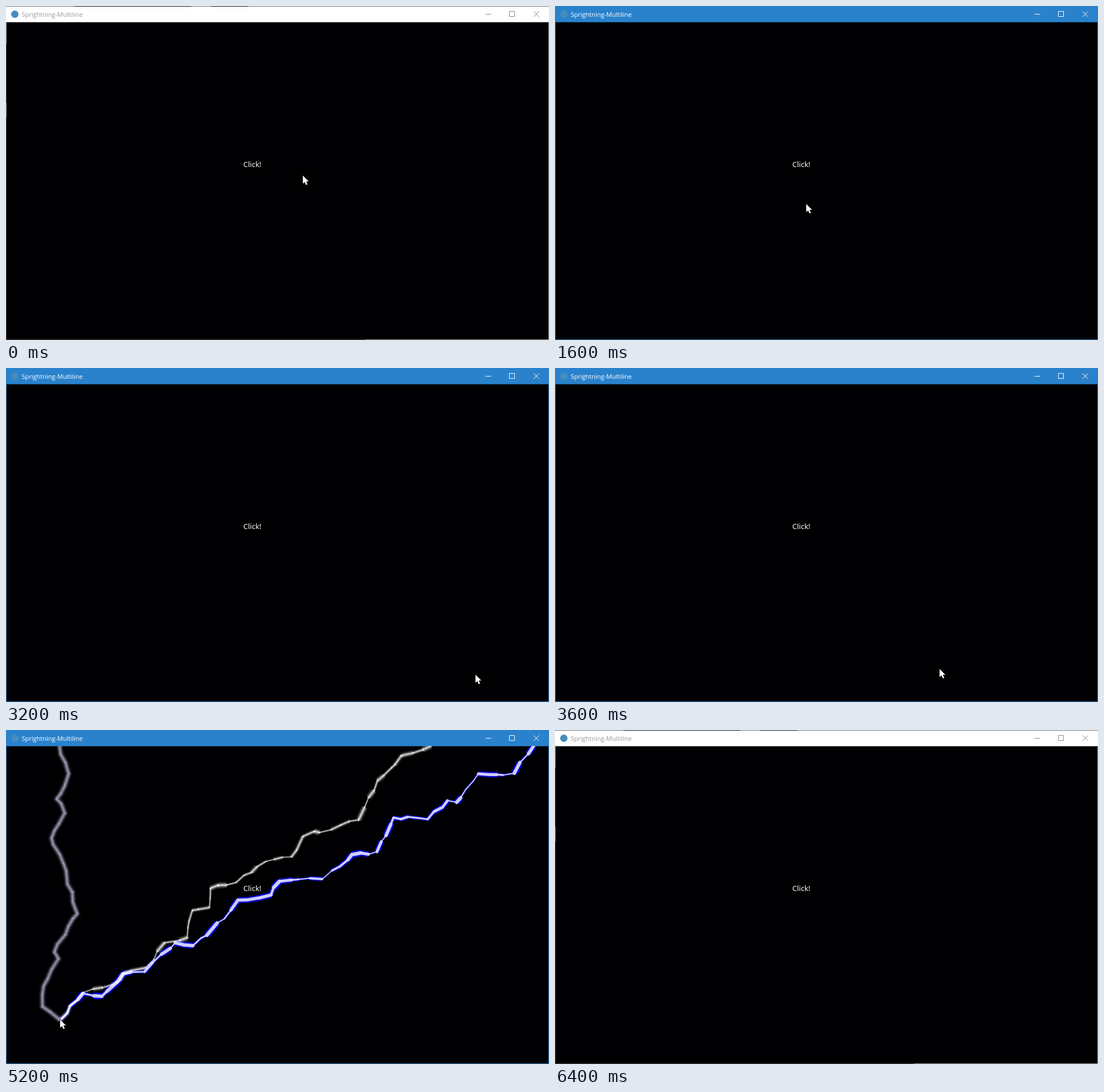
An HTML page that plays this animation: 953x587 px, repeating every 6600 ms.

```html
<!DOCTYPE html>
<html lang="en">
<head>
<meta charset="utf-8">
<title>Sprightning-Multiline</title>
<style>
  html, body { margin: 0; width: 100%; height: 100%; overflow: hidden; background: #000; }
  svg { display: block; width: 953px; height: 587px; }
  .title { font: 11px "Open Sans", sans-serif; }
  .label { font: 13px "Noto Sans", sans-serif; fill: #fff; }
  .bolt { mix-blend-mode: screen; fill: none; }
</style>
</head>
<body>
<svg id="stage" viewBox="0 0 953 587">
  <defs><clipPath id="view"><rect x="1" y="28" width="951" height="558"/></clipPath></defs>
  <rect width="953" height="587" fill="#000002"/>
  <rect id="bar" width="953" height="28.5"/>
  <g id="idleEdge" fill="none">
    <path d="M0 .5H953" stroke="#777"/>
    <path d="M120 .5H325M360 .5H425" stroke="#111"/>
    <path d="M.5 29V66M.5 170V196M952.5 29V587M630 586.5H953" stroke="#a0a0a0"/>
    <path d="M.5 66V170M.5 196V587M0 586.5H630" stroke="#444"/>
  </g>
  <path id="activeEdge" d="M.5 0V586.5H952.5V0" fill="none" stroke="#2b7fc2"/>
  <circle cx="15.5" cy="14.5" r="6.5" fill="#478cbf"/>
  <text id="title" class="title" x="27.5" y="18.5">Sprightning-Multiline</text>
  <path id="buttons" d="M841.5 14.5H851.5M883.5 9.5H892.5V18.5H883.5ZM926 9.5L935.5 19M935.5 9.5L926 19" fill="none"/>
  <g id="sky" clip-path="url(#view)"></g>
  <text class="label" x="416.5" y="283">Click!</text>
  <path id="cursor" d="M0 0V14.2L3.3 11.2 5.6 16.6 8.1 15.5 5.8 10.3H10.2Z" fill="#fff" stroke="#000" stroke-width="1.6" paint-order="stroke"/>
</svg>
<script>
const LOOP = 6600, STEP = 200;
const $ = id => document.getElementById(id);

function add(parent, tag, attrs) {
  const el = document.createElementNS("http://www.w3.org/2000/svg", tag);
  for (const k in attrs) el.setAttribute(k, attrs[k]);
  parent.appendChild(el);
  return el;
}

function seeded(seed) {
  return () => (seed = (seed * 16807) % 2147483647) / 2147483647;
}

// Roughens the line through a few key points; each segment gets its own width.
function jag(keys, rnd) {
  const pts = [{ x: keys[0][0], y: keys[0][1], w: 0 }];
  for (let i = 1; i < keys.length; i++) {
    const [x0, y0] = keys[i - 1], [x1, y1] = keys[i];
    const len = Math.hypot(x1 - x0, y1 - y0), n = Math.max(1, Math.round(len / 17));
    for (let j = 1; j <= n; j++) {
      const last = j === n;
      const k = last ? 1 : (j + (rnd() - 0.5) * 0.7) / n;
      const off = last ? 0 : (rnd() - 0.5) * 6 / len;
      pts.push({
        x: x0 + (x1 - x0) * k - (y1 - y0) * off,
        y: y0 + (y1 - y0) * k + (x1 - x0) * off,
        w: 3 + 9 * rnd()
      });
    }
  }
  return pts;
}

function strokeSegments(g, pts, color, opacity, cap, width) {
  pts.slice(1).forEach((p, i) => add(g, "path", {
    d: `M${pts[i].x} ${pts[i].y}L${p.x} ${p.y}`, stroke: color, "stroke-opacity": opacity,
    "stroke-width": width(p.w), "stroke-linecap": cap
  }));
}

// Short bright nicks where segments meet.
function nicks(g, pts, color, size, rnd) {
  const d = pts.slice(1, -1).map(({ x, y }) => {
    const a = rnd() * Math.PI, r = size * (0.5 + rnd() * 0.5);
    const dx = Math.cos(a) * r, dy = Math.sin(a) * r;
    return `M${x - dx} ${y - dy}L${x + dx} ${y + dy}`;
  }).join("");
  add(g, "path", { d, stroke: color, "stroke-opacity": 0.6 });
}

const styles = {
  soft(g, pts, rnd) {
    const d = "M" + pts.map(p => `${p.x} ${p.y}`).join("L");
    for (const [w, o] of [[12, 0.11], [9, 0.17], [6.5, 0.27], [4, 0.4], [2, 0.35]])
      add(g, "path", { d, stroke: "#aeaecb", "stroke-width": w, "stroke-opacity": o, "stroke-linejoin": "round" });
    nicks(g, pts, "#c4c4dc", 4, rnd);
  },
  white(g, pts, rnd) {
    strokeSegments(g, pts, "#fff", 0.12, "butt", w => w);
    strokeSegments(g, pts, "#fff", 0.22, "butt", w => w * 0.7);
    strokeSegments(g, pts, "#fff", 0.35, "round", w => w * 0.4);
    strokeSegments(g, pts, "#fff", 0.6, "round", w => Math.max(0.8, w * 0.2));
    nicks(g, pts, "#fff", 3.5, rnd);
  },
  blue(g, pts) {
    strokeSegments(g, pts, "#0000d4", 1, "butt", w => w);
    strokeSegments(g, pts, "#ceceff", 1, "round", w => Math.max(1.6, w * 0.52));
  }
};

const strikes = [];
function strike(from, to, [x, y], bolts) {
  const g = add($("sky"), "g", {});
  Object.entries(bolts).forEach(([kind, text], i) => {
    const keys = text.split(/\s+/).map(p => p.split(",").map(Number));
    const rnd = seeded(from * 7 + i * 131 + 1);
    styles[kind](add(g, "g", { class: "bolt" }), jag([...keys, [x, y]], rnd), rnd);
  });
  strikes.push({ from, to, g });
}

strike(1000, 1400, [428, 268], {
  soft: "790,28 715,49 689,116 663,107 636,131 592,136 587,177 506,182 492,237 440,249",
  white: "118,28 125,43 162,69 205,64 236,95 271,129 299,141 305,161 326,160 349,210 380,252",
  blue: "343,28 331,72 354,104 351,126 369,161 404,178 438,248"
});

strike(2200, 2600, [465, 511], {
  soft: "146,28 146,65 185,82 212,132 259,156 254,204 292,235 299,300 368,329 380,399 408,405 438,494",
  white: "707,28 654,96 657,143 618,175 598,200 612,256 573,323 567,368 510,392 515,429 469,484",
  blue: "598,28 608,85 566,123 580,182 531,258 540,298 526,328 486,376 482,473 463,490"
});

strike(5000, 5400, [95, 510], {
  soft: "94,28 110,77 89,121 103,146 80,190 101,235 125,323 85,390 92,402 66,450 64,486",
  white: "746,28 694,45 652,89 619,158 521,187 501,223 456,231 404,268 359,278 357,312 327,317 318,365 278,374 245,418 206,427 200,440 134,462",
  blue: "926,28 892,76 829,77 791,127 775,124 740,157 680,154 651,214 607,219 555,262 480,266 465,290 407,299 383,332 328,379 297,374 243,425 205,429 168,468 135,463"
});

// Pointer path: time, x, y
const path = [
  [0, 521, 298], [600, 429, 267], [1400, 429, 267], [2000, 464, 511], [2600, 464, 511],
  [3200, 824, 539], [3400, 824, 539], [4000, 378, 508], [4600, 95, 509],
  [5600, 95, 509], [6000, 130, 590], [LOOP, 130, 590]
];

function pointer(t) {
  const i = path.findIndex(p => p[0] > t);
  const [t0, x0, y0] = path[i - 1], [t1, x1, y1] = path[i];
  const k = (t - t0) / (t1 - t0);
  return [x0 + (x1 - x0) * k, y0 + (y1 - y0) * k];
}

const show = (el, on) => el.setAttribute("visibility", on ? "visible" : "hidden");

function draw(time) {
  const t = Math.floor((time % LOOP) / STEP) * STEP;
  const active = t >= 1000 && t < 6200;
  $("bar").setAttribute("fill", active ? "#2a82cc" : "#fff");
  $("title").setAttribute("fill", active ? "#fff" : "#999");
  $("buttons").setAttribute("stroke", active ? "#fff" : "#888");
  show($("idleEdge"), !active);
  show($("activeEdge"), active);
  for (const s of strikes) show(s.g, t >= s.from && t < s.to);
  const [x, y] = pointer(t).map(Math.round);
  $("cursor").setAttribute("transform", `translate(${x} ${y})`);
  show($("cursor"), y < 587);
}

const start = performance.now();
function tick() {
  draw(performance.now() - start);
  requestAnimationFrame(tick);
}
tick();
</script>
</body>
</html>
```
